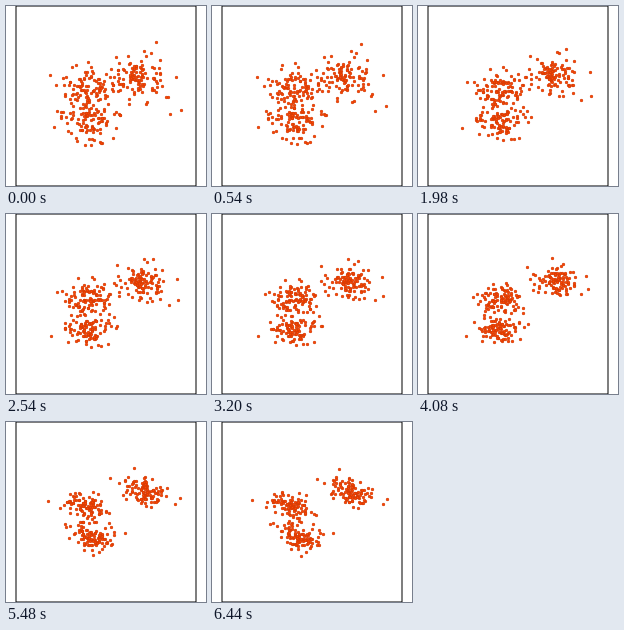
A matplotlib script that plays this animation: 200x180 px, repeating every 6460 ms.

```python
import numpy as np
import matplotlib.pyplot as plt
from matplotlib.animation import FuncAnimation
from matplotlib.patches import Rectangle

W, H, DPI = 200, 180, 100
PX = 72 / DPI
TICK, TICKS = 20, 323
HOLD = [0, 1, 1, 1, 1, 1, 2]   # steps last 20, 100 and 20 ms in turn
TURN, END = 88, 138            # the tour changes course at TURN

# Each path: start, turn, end
CENTRES = np.array([
    [(132, 72), (138, 67), (138, 70)],
    [(83, 82), (83, 85), (79, 84)],
    [(82, 115), (80, 115), (87, 115)],
])
SIZES = [105, 100, 100]
SHAPE = np.array([(13.5, 10.5, 0.1), (10.5, 6.8, 0.05), (10.5, 6.8, 0.42)])
STRAYS = np.array([
    [(175, 104), (170, 75), (175, 76.5)],
    [(163.5, 108), (163, 80), (171, 82)],
    [(150, 36), (145, 50), (137, 56)],
    [(145, 47), (133.5, 44), (127, 47)],
    [(44, 69), (55, 83), (39.5, 77.5)],
    [(110, 122), (109.5, 109.5), (121, 111)],
])

rng = np.random.default_rng(7)


def cloud(n):
    """Normal scatter without far tails, centred and with unit spread."""
    z = rng.standard_normal((n, 4))
    z /= np.maximum(1, np.hypot(*z.T[:2]) / 2.4)[:, None]
    z -= z.mean(axis=0)
    return np.linalg.solve(np.linalg.cholesky(np.cov(z.T)), z.T)


clouds = [cloud(n) for n in SIZES]


def tour_phase(step):
    """0 to 1 at constant speed, then 1 to 2 slowing to a stop."""
    if step <= TURN:
        return step / TURN
    return 1 + np.sin(np.pi / 2 * (step - TURN) / (END - TURN))


def along(path, phase):
    i = min(int(phase), 1)
    return path[i] + (path[i + 1] - path[i]) * (phase - i)


def positions(step):
    phase = tour_phase(step)
    sx, sy, r = along(SHAPE, phase)
    c, s = np.cos(0.8 * phase), np.sin(0.8 * phase)
    parts = [[along(path, phase) for path in STRAYS]]
    for path, z in zip(CENTRES, clouds):
        u, v = c * z[:2] + s * z[2:]
        spread = [sx * u, sy * (r * u + np.sqrt(1 - r * r) * v)]
        parts.append(along(path, phase) + np.transpose(spread))
    return np.vstack(parts)


fig = plt.figure(figsize=(W / DPI, H / DPI), dpi=DPI, facecolor="white")
ax = fig.add_axes([0, 0, 1, 1])
ax.set(xlim=(0, W), ylim=(H, 0))
ax.axis("off")
ax.add_patch(Rectangle((10, 0), 180, 180, fill=False, ec="black", lw=PX,
                       snap=False))
dots, = ax.plot([], [], "o", ms=2.4 * PX, mfc="#ff4500", mec="#d83c04",
                mew=0.8 * PX, snap=False)


def draw(k):
    step = 3 * (k // 7) + HOLD[k % 7]
    dots.set_data(*positions(step).T)
    return dots,


anim = FuncAnimation(fig, draw, frames=TICKS, interval=TICK, repeat=True)
plt.show()
```
